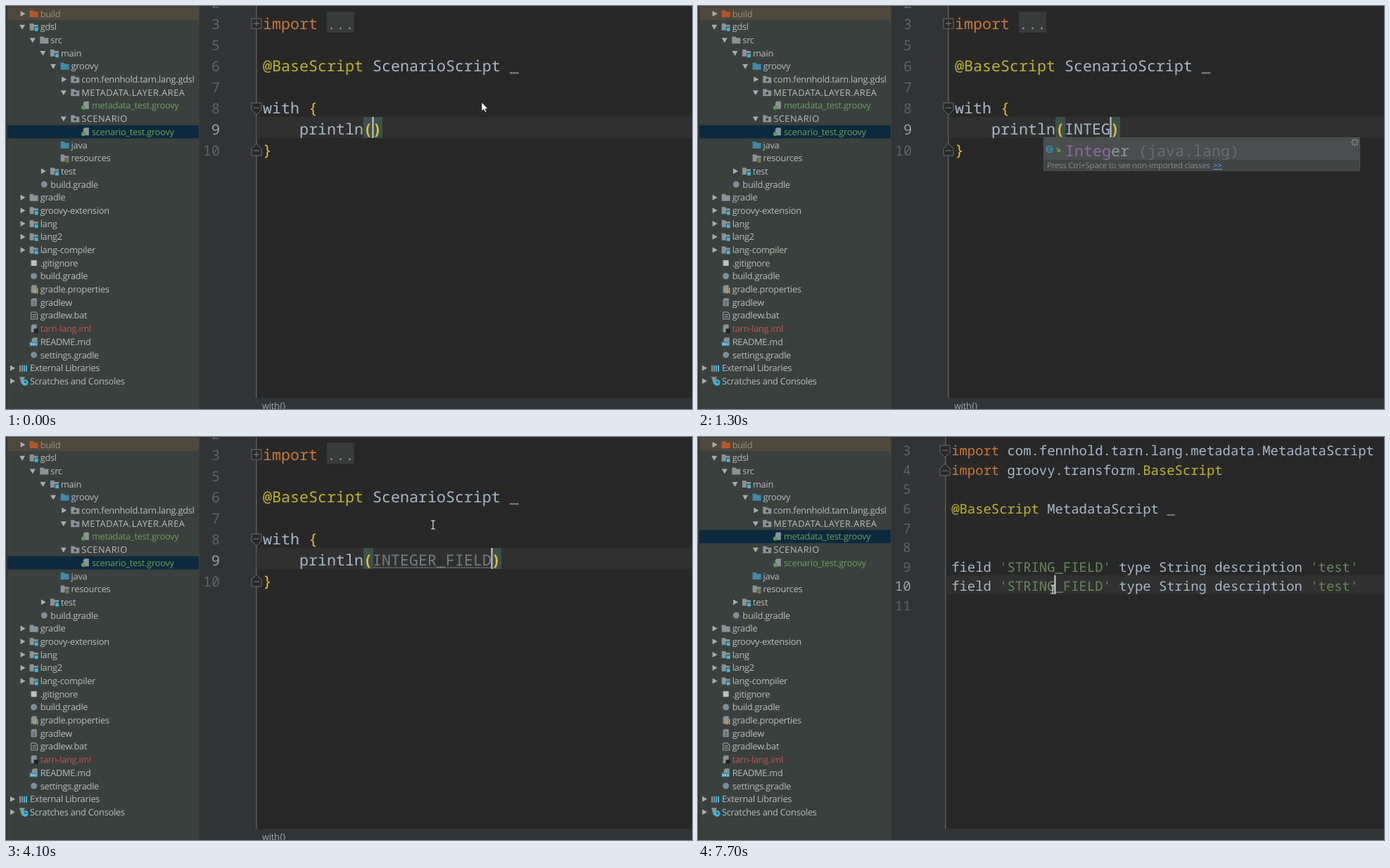
Write an HTML page that moves like this. It is 975 px wide and 574 px high and loops after 8000 ms.

```html
<!DOCTYPE html>
<html lang="en">
<head>
<meta charset="utf-8">
<title>Editor session</title>
<style>
  html, body { margin: 0; width: 100%; height: 100%; overflow: hidden; background: #282828; }
  svg { display: block; width: 975px; height: 574px; }
  text { white-space: pre; text-rendering: geometricPrecision; }
  .code { font-family: "Noto Sans Mono", "DejaVu Sans Mono", monospace; }
  .ui { font-family: "Open Sans", "Noto Sans", sans-serif; font-size: 12.8px; letter-spacing: -.26px; }
  .caps { letter-spacing: .5px; }
  .hint { font-size: 11.4px; letter-spacing: -.2px; }
</style>
</head>
<body>
<svg viewBox="0 0 975 574">
  <g id="editor"></g>
  <g id="tree"></g>
  <g id="pointer"></g>
</svg>
<script>
const LOOP = 8000, TICK = 100;
const C = {
  plain: '#a9b7c6', keyword: '#cc7832', note: '#bbb529', string: '#6a8759', brace: '#e8ba36',
  unused: '#7b7d7f', number: '#606366', current: '#a4a3a3', match: '#9068a3',
  editor: '#282828', gutter: '#313335', row: '#303030', fold: '#6a6c6d', bracketBg: '#3b514d',
  panel: '#3a403e', label: '#bbbdbb', added: '#67a059', icon: '#87949a', cyan: '#40b6d8',
  popup: '#404544', popupRow: '#4a4e4e', popupText: '#8d979b', popupDim: '#686d6d'
};

const rect = (x, y, w, h, fill, extra = '') =>
  `<rect x="${x}" y="${y}" width="${w}" height="${h}" fill="${fill}" ${extra}/>`;
const circle = (x, y, r, fill) => `<circle cx="${x}" cy="${y}" r="${r}" fill="${fill}"/>`;
const path = (d, fill, stroke = 'none', width = 1) =>
  `<path d="${d}" fill="${fill}" stroke="${stroke}" stroke-width="${width}"/>`;
const ui = (x, y, text, fill, cls = '') =>
  `<text class="ui ${cls}" x="${x}" y="${y}" fill="${fill}">${text}</text>`;

// parts alternate between text and colour
function code(x, y, size, parts, anchor = 'start', weight = 400) {
  let spans = '';
  for (let i = 0; i < parts.length; i += 2) spans += `<tspan fill="${parts[i + 1]}">${parts[i]}</tspan>`;
  return `<text class="code" x="${x}" y="${y}" font-size="${size}" font-weight="${weight}" text-anchor="${anchor}">${spans}</text>`;
}

function wave(x, y, width) {
  let d = `M${x} ${y}`;
  for (let i = 2; i <= width; i += 2) d += `L${x + i} ${y - (i / 2 % 2) * 2}`;
  return path(d, 'none', '#77797a');
}

function foldBox(x, y) {
  return rect(x - 7, y - 7, 14, 14, C.editor, `stroke="${C.fold}"`) +
    path(`M${x - 4} ${y}h8M${x} ${y - 4}v8`, 'none', C.fold, 1.3);
}

function foldEnd(x, y, dir) {
  return path(`M${x - 7} ${y - 8 * dir}h14v${10 * dir}l-7 ${7 * dir}l-7 ${-7 * dir}z`, C.editor, C.fold) +
    path(`M${x - 4} ${y - dir}h8`, 'none', C.fold, 1.3);
}

// ---------- project tree ----------
const folder = (x, y, fill = C.icon) => path(`M${x} ${y - 5}h5l1.5 2h5.5v8h-12z`, fill);
const page = (x, y) => path(`M${x + 4} ${y - 6}h6v11h-8v-9z`, C.icon);
const icons = {
  build: (x, y) => folder(x, y, '#b5552a'),
  folder,
  source: (x, y) => folder(x, y, '#3e8aa8'),
  module: (x, y) => folder(x, y) + rect(x + 6, y, 7, 7, C.panel) + rect(x + 7, y + 1, 5, 5, C.cyan),
  pack: (x, y) => folder(x, y) + circle(x + 6, y + 1, 2, C.panel),
  resources: (x, y) => folder(x, y) + rect(x + 6, y, 7, 7, C.panel) +
    path(`M${x + 7} ${y + 1.5}h5m-5 2h5m-5 2h5`, 'none', '#c9a34a'),
  script: (x, y) => page(x + 1, y) + circle(x + 3, y + 3, 3, '#5c9a55'),
  tool: (x, y) => circle(x + 6, y, 4.5, '#7b8f97'),
  ignore: (x, y) => rect(x + 2, y - 4, 8, 8, '#bcc0c1'),
  props: (x, y) => page(x, y) + path(`M${x + 6} ${y + 6}v-4m2.5 4v-6m2.5 6v-8`, 'none', '#d49a4a', 1.5),
  text: (x, y) => page(x, y) + path(`M${x + 4} ${y - 2}h4m-4 2.5h4m-4 2.5h4`, 'none', C.panel),
  batch: (x, y) => path(`M${x + 3} ${y - 5}h5l3 3v7h-9v-9z`, 'none', C.icon, 1.3) +
    path(`M${x + 4} ${y - 1}h5m-5 3h5`, 'none', C.icon, 1.5),
  iml: (x, y) => page(x, y) + rect(x + 6, y, 6, 6, '#202224'),
  doc: (x, y) => page(x + 1, y) + rect(x, y, 11, 6, '#3f8fb3') + path(`M${x + 2} ${y + 5}v-3l2 2l2-2v3m3-3v3`, 'none', '#d5e2e8'),
  library: (x, y) => path(`M${x + 1} ${y - 4}v9m3-9v9`, 'none', C.icon, 2) +
    path(`M${x + 7} ${y - 4}v9m3-9v9`, 'none', C.cyan, 2),
  scratch: (x, y) => path(`M${x} ${y - 6}h8l-2 4l3 6h-6z`, C.icon) + circle(x + 8, y + 2, 4.5, C.cyan) +
    path(`M${x + 8} ${y - 1}v3h2.5`, 'none', C.panel, 1.2)
};

// depth, arrow (> closed, v open), icon, label
const rows = `1 > build build
1 v module gdsl
2 v folder src
3 v module main
4 v source groovy
5 > pack com.fennhold.tarn.lang.gdsl
5 v pack METADATA.LAYER.AREA
6 - script metadata_test.groovy
5 v pack SCENARIO
6 - script scenario_test.groovy
4 - source java
4 - resources resources
3 > module test
2 - tool build.gradle
1 > folder gradle
1 > module groovy-extension
1 > module lang
1 > module lang2
1 > module lang-compiler
1 - ignore .gitignore
1 - tool build.gradle
1 - props gradle.properties
1 - text gradlew
1 - batch gradlew.bat
1 - iml tarn-lang.iml
1 - doc README.md
1 - tool settings.gradle
0 > library External Libraries
0 > scratch Scratches and Consoles`.split('\n').map(line => {
  const [depth, arrow, icon, ...label] = line.split(' ');
  return { depth: +depth, arrow, icon, label: label.join(' ') };
});
const METADATA_ROW = 7, SCENARIO_ROW = 9, ROW_PITCH = 18.69;

function labelColor({ icon, label }) {
  if (icon === 'build') return '#979181';
  if (icon === 'script') return C.added;
  return label.endsWith('.iml') ? '#c4534d' : C.label;
}

function drawTree(selected, focused) {
  let out = rect(0, 0, 275, 574, C.panel) + rect(0, 0, 2, 574, '#323736') + rect(2, 1, 272, 19, '#4f483c');
  rows.forEach((row, i) => {
    const x = 34 + 14.65 * row.depth, y = 11 + ROW_PITCH * i;
    if (i === selected) out += rect(2, y - ROW_PITCH / 2, 272, ROW_PITCH, focused ? '#2f65ca' : '#0d293e');
    if (row.arrow === '>') out += path(`M${x - 28} ${y - 4}l7 4l-7 4z`, '#a9adab');
    if (row.arrow === 'v') out += path(`M${x - 29.5} ${y - 3}h8l-4 7z`, '#a9adab');
    const caps = /^[A-Z.]+$/.test(row.label) ? 'caps' : '';
    const fill = i === selected && focused ? '#b3c6cc' : labelColor(row);
    out += icons[row.icon](x - 15, y) + ui(x, y + 4.6, row.label, fill, caps);
  });
  return out;
}

// ---------- editor ----------
function frame(gutterEnd) {
  return rect(275, 0, 700, 574, C.editor) + rect(275, 0, gutterEnd - 275, 558, C.gutter) +
    rect(gutterEnd - 1, 0, 1.5, 558, '#5a5c5d') + rect(275, 558, 700, 16, C.gutter);
}
const caret = (x, y, h) => rect(x - .5, y, 2, h, '#d0d0d0');

// what has been typed between the parentheses, by start time
const typing = [[0, ''], [300, 'I'], [700, 'IN'], [900, 'INT'], [1100, 'INTE'], [1300, 'INTEG'],
  [1500, 'INTEGE'], [1700, 'INTEGER'], [2000, 'INTEGER_'], [2700, 'INTEGER_F'], [2800, 'INTEGER_FI'],
  [3100, 'INTEGER_FIE'], [3300, 'INTEGER_FIEL'], [3600, 'INTEGER_FIELD']];

function drawScenario(t) {
  const size = 21.67, cell = 13, left = 365;
  const base = i => 32.5 + 30 * i;
  const write = (col, i, ...parts) => code(left + col * cell, base(i), size, parts);
  const typed = typing.filter(([start]) => start <= t).pop()[1];
  const end = left + (12 + typed.length) * cell;
  const bracket = (x, char) => rect(x, 158, 14, 30, C.bracketBg) +
    code(x, base(5), size, [char, C.brace], 'start', 700);
  const fresh = t >= 300 && t < 600;
  const unresolved = t >= 2400;

  let out = frame(356) + rect(356.5, 158, 619, 30, C.row);
  [2, 3, 5, 6, 7, 8, 9, 10].forEach((n, i) => {
    out += code(304, base(i - 1), 20, [n, n === 9 ? C.current : C.number], 'end');
  });
  out += foldBox(356, 25) + foldEnd(356, 146, 1) + foldEnd(356, 205, -1);
  out += write(0, 0, 'import', C.keyword) + rect(456, 8, 39, 30, '#393b3b') + write(7, 0, '...', '#87908a');
  out += write(0, 2, '@BaseScript', C.note, ' ScenarioScript ', C.plain, '_', '#8b8d8e') + wave(716, 96, 12);
  out += write(0, 4, 'with ', C.plain, '{', C.brace) + write(0, 6, '}', C.brace);
  out += bracket(left + 11 * cell, '(');
  if (!fresh) out += bracket(end, ')');
  out += write(4, 5, 'println ', C.plain, typed, unresolved ? C.unused : C.plain);
  if (unresolved) out += wave(522, 187, typed.length * cell);
  if (t < 5000) out += caret(end, 158, 30);
  if (t >= 4800) out += circle(376, 169, 4.7, '#eba83a') + rect(374, 173.5, 4, 3, '#a6a6a6');
  if (t >= 700 && t < 2000) out += drawPopup(t < 1100, typed.length);
  return out + ui(364, 573.5, 'with{}', '#a3a5a5');
}

const suggestions = [
  ['I', 'IFileNameFinder', '(groovy.util)'], ['C', 'Integer', '(java.lang)'],
  ['+', 'IncompatibleClassChangeError', '(…'], ['+', 'IndexOutOfBoundsException', '(jav…'],
  ['C', 'InheritableThreadLocal&lt;T>', '(jav…'], ['+', 'InstantiationError', '(java.lang)'],
  ['+', 'InstantiationException', '(java.l…']];

function drawSuggestion([kind, name, origin], i, matched) {
  const y = 206 + 31.5 * i, text = C.popupText;
  const parts = kind === 'I'
    ? ['I', C.match, 'File', text, 'N', C.match, 'ameFinder', text]
    : [name.slice(0, matched), C.match, name.slice(matched), text];
  return circle(499.5, y - 2, 5.5, kind === 'I' ? '#4f8a4d' : '#3f7f95') +
    `<text class="ui" x="499.5" y="${y + 1}" style="font-size:8px" text-anchor="middle" fill="#1f2c31">${kind}</text>` +
    rect(510.5, y - 2, 5, 4, '#5b9355') + path(`M509.5 ${y - 2}v-2h3v2`, 'none', '#5b9355') +
    code(522, y + 8, 21.67, [...parts, ' ' + origin, C.popupDim]);
}

function drawPopup(full, matched) {
  const bottom = full ? 408 : 235, bar = bottom - 16;
  const hint = full ? 'Ctrl+Down and Ctrl+Up will move caret down and up in the editor'
    : 'Press Ctrl+Space to see non-imported classes';
  let out = rect(491.5, 187.5, 449, bottom - 188, C.popup, 'stroke="#505453"') +
    rect(492, 188, full ? 437 : 448, 31, C.popupRow);
  const items = full ? suggestions : [suggestions[1]];
  items.forEach((item, i) => out += drawSuggestion(item, i, full ? 2 : matched));
  out += rect(492, bar, 448, 15.5, C.popup);
  out += ui(496, bottom - 4, hint, '#858a8a', 'hint');
  const link = full ? 836 : 732;
  out += ui(link, bottom - 4, '>>', '#589df6', 'hint') + rect(link, bottom - 3, 13, 1, '#589df6');
  if (full) return out + rect(932, 189, 7, 21, '#5d6262') + ui(930.5, bottom - 4, 'π', '#c0c2c3', 'hint');
  for (let a = 0; a < 8; a++) {
    const c = Math.cos(a * Math.PI / 4), s = Math.sin(a * Math.PI / 4);
    out += path(`M${933.5 + 2.5 * c} ${194 + 2.5 * s}l${3 * c} ${3 * s}`, 'none', '#9a9c9d', 1.2);
  }
  return out;
}

function drawMetadata(t) {
  const size = 18.9, left = 360.2, cell = 11.34, pitch = 27.6;
  const base = n => 219.3 - (10 - n) * pitch;
  const write = (n, ...parts) => code(left, base(n), size, parts);
  const copied = t >= 6800, clicked = t >= 6300;
  const line = clicked && !copied ? 9 : 10;
  const top = base(line) - 22.6;

  let out = frame(352) + rect(352.5, top, 623, 27, C.row);
  for (let n = 3; n <= (copied ? 11 : 10); n++) {
    out += code(302.5, base(n), size, [n, n === line ? C.current : C.number], 'end');
  }
  out += foldEnd(351, 20, 1) + foldEnd(351, 47, -1);
  out += write(3, 'import', C.keyword, ' com.fennhold.tarn.lang.metadata.MetadataScript', C.plain);
  out += write(4, 'import', C.keyword, ' groovy.transform.', C.plain, 'BaseScript', C.note);
  out += write(6, '@BaseScript', C.note, ' MetadataScript ', C.plain, '_', '#8b8d8e') + wave(667, 112, 11);
  for (let n = 9; n <= (copied ? 10 : 9); n++) {
    out += write(n, 'field ', C.plain, "'STRING_FIELD'", C.string, ' type String description ', C.plain, "'test'", C.string);
  }
  return out + caret(left + (clicked ? 13 : 0) * cell - .7, top, 27);
}

// ---------- pointer ----------
const moves = [
  [[0, 676, 138], [600, 676, 138]],
  [[3900, 676, 138], [4100, 607, 125], [4300, 400, 99], [4500, 248, 98], [4700, 174, 132], [5000, 181, 139],
    [5800, 181, 139], [6000, 403, 165], [6100, 403, 165], [6200, 490, 181], [6300, 504, 186], [6800, 504, 186]],
  [[7100, 504, 194], [7300, 535, 201], [7500, 484, 214], [7700, 504, 217], [8000, 504, 217]]];

function drawPointer(t) {
  const track = moves.find(m => t >= m[0][0] && t < m[m.length - 1][0]);
  if (!track) return '';
  const i = track.findIndex(key => key[0] > t);
  const [t0, x0, y0] = track[i - 1], [t1, x1, y1] = track[i];
  const k = (t - t0) / (t1 - t0);
  const x = x0 + (x1 - x0) * k, y = y0 + (y1 - y0) * k;
  const arrow = t < 100 || x < 356;
  return `<g transform="translate(${x} ${y})">` + (arrow
    ? path('M0 -1V12L3 9.3L5 13.5L7 12.6L5.2 8.6H9Z', '#fff', '#1b1b1b', .8)
    : path('M-3 -6h2l1 1l1-1h2M-3 6h2l1-1l1 1h2M0 -5V5', 'none', '#e4e4e4', 1.2)) + '</g>';
}

// ---------- playback ----------
const layers = ['editor', 'tree', 'pointer'].map(id => document.getElementById(id));
const shown = [];

function show(t) {
  const selected = t < 5300 ? SCENARIO_ROW : METADATA_ROW;
  const content = [
    t < 5600 ? drawScenario(t) : drawMetadata(t),
    drawTree(selected, t >= 5300 && t < 5600),
    drawPointer(t)
  ];
  content.forEach((svg, i) => {
    if (shown[i] !== svg) layers[i].innerHTML = shown[i] = svg;
  });
}

const start = performance.now();
let last = -1;
function play() {
  const t = Math.floor((performance.now() - start) % LOOP / TICK) * TICK;
  if (t !== last) show(last = t);
  requestAnimationFrame(play);
}
play();
</script>
</body>
</html>
```
